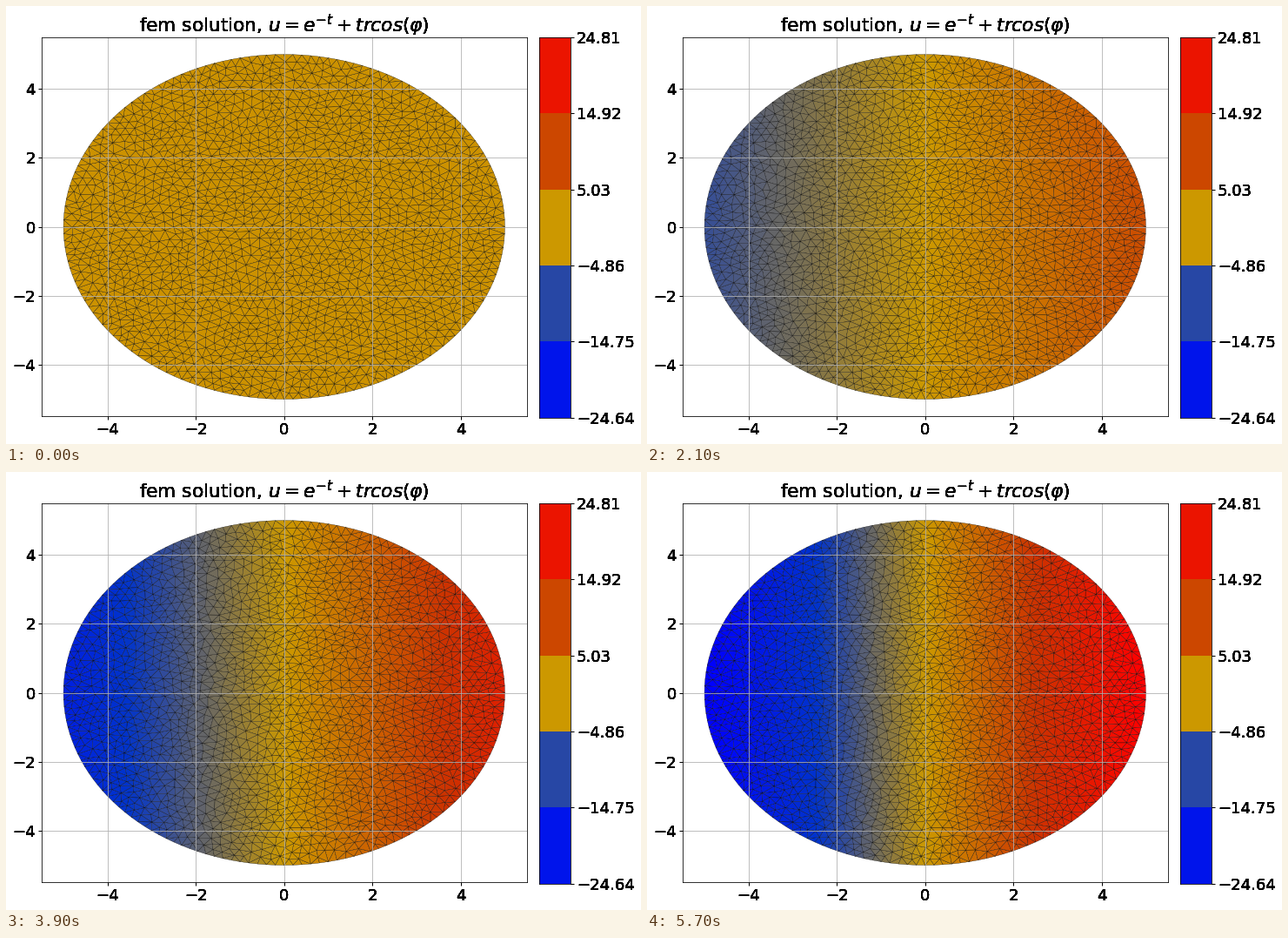
Animation, 730 px wide and 503 px high, one loop 6000 ms. Source, as a matplotlib script:

```python
import numpy as np
import matplotlib.pyplot as plt
from matplotlib.animation import FuncAnimation
from matplotlib.colors import LinearSegmentedColormap, ListedColormap
from matplotlib.tri import Triangulation

W, H, DPI = 730, 503, 72
FRAMES, INTERVAL = 20, 300
R, SPACING = 5.0, 0.165
VMIN, VMAX = -24.64, 24.81
TIMES = np.linspace(0, 5, FRAMES)
INK = 8  # passes per label, for heavy text

plt.rcParams.update({"font.family": "DejaVu Sans", "font.size": 18,
                     "mathtext.fontset": "dejavusans"})

cmap = LinearSegmentedColormap.from_list(
    "heat", [(0, 0, 1), (0, .2, .8), (.8, .6, 0), (.8, .2, 0), (1, 0, 0)], N=256)


def disc_mesh():
    """Unstructured triangles filling the disc."""
    rng = np.random.default_rng(7)
    n_rim = 156
    a = 2 * np.pi * np.arange(n_rim) / n_rim
    pts = np.empty((4000, 2))
    pts[:n_rim] = R * np.column_stack([np.cos(a), np.sin(a)])
    n = n_rim
    for p in rng.uniform(-R, R, (28000, 2)):
        if p @ p > (R - 0.13) ** 2:
            continue
        if ((pts[:n] - p) ** 2).sum(axis=1).min() > SPACING ** 2:
            pts[n] = p
            n += 1
    pts = pts[:n]

    # one half-step of Laplacian smoothing on the inner nodes
    edges = Triangulation(*pts.T).edges
    total, count = np.zeros_like(pts), np.zeros(n)
    for i, j in (edges.T, edges.T[::-1]):
        np.add.at(total, i, pts[j])
        np.add.at(count, i, 1)
    inner = slice(n_rim, n)
    mean = total[inner] / count[inner, None]
    pts[inner] = 0.5 * pts[inner] + 0.5 * mean
    return Triangulation(*pts.T)


def box(left, top, right, bottom):
    return [left / W, 1 - bottom / H, (right - left) / W, (bottom - top) / H]


def label(ax, x, y, s, placement):
    trans, va, ha = placement
    for _ in range(INK):
        ax.text(x, y, s.replace("-", "\u2212"), transform=trans, va=va, ha=ha)


def solution(t):
    return np.exp(-t) + t * centre_x


fig = plt.figure(figsize=((W + 1e-6) / DPI, (H + 1e-6) / DPI), dpi=DPI,
                 facecolor="white")

ax = fig.add_axes(box(40.7, 35.8, 598.8, 471.3))
mesh = disc_mesh()
centre_x = mesh.x[mesh.triangles].mean(axis=1)
field = ax.tripcolor(mesh, facecolors=solution(0), cmap=cmap, vmin=VMIN,
                     vmax=VMAX, edgecolors="k", linewidth=0.3)
ticks = [-4, -2, 0, 2, 4]
ax.set(xlim=(-5.5, 5.5), ylim=(-5.5, 5.5), xticks=ticks, yticks=ticks)
ax.tick_params(labelbottom=False, labelleft=False, width=1, length=4)
ax.grid(True)
for v in ticks:
    label(ax, v, 0, str(v), ax.get_xaxis_text1_transform(7))
    label(ax, 0, v, str(v), ax.get_yaxis_text1_transform(7))
for _ in range(INK):
    ax.annotate(r"fem solution, $u=e^{-t} + trcos(\varphi)$", (0.5, 1),
                xycoords="axes fraction", xytext=(0, 6),
                textcoords="offset points", ha="center", fontsize="large")

cax = fig.add_axes(box(612.8, 35.8, 649.0, 472.7))
bands = ListedColormap(cmap([0.1, 0.3, 0.5, 0.7, 0.9]))
levels = np.linspace(VMIN, VMAX, 6)
cax.pcolormesh([0, 1], levels, np.arange(5)[:, None], cmap=bands)
cax.set(xlim=(0, 1), ylim=(VMIN, VMAX), xticks=[], yticks=levels)
cax.yaxis.tick_right()
cax.tick_params(labelright=False, width=1, length=4)
for v in levels:
    label(cax, 1, v, f"{v:.2f}", cax.get_yaxis_text2_transform(7))


def update(i):
    field.set_array(solution(TIMES[i]))
    return field,


anim = FuncAnimation(fig, update, frames=FRAMES, interval=INTERVAL,
                     repeat=True, repeat_delay=0, blit=False)
plt.show()
```
